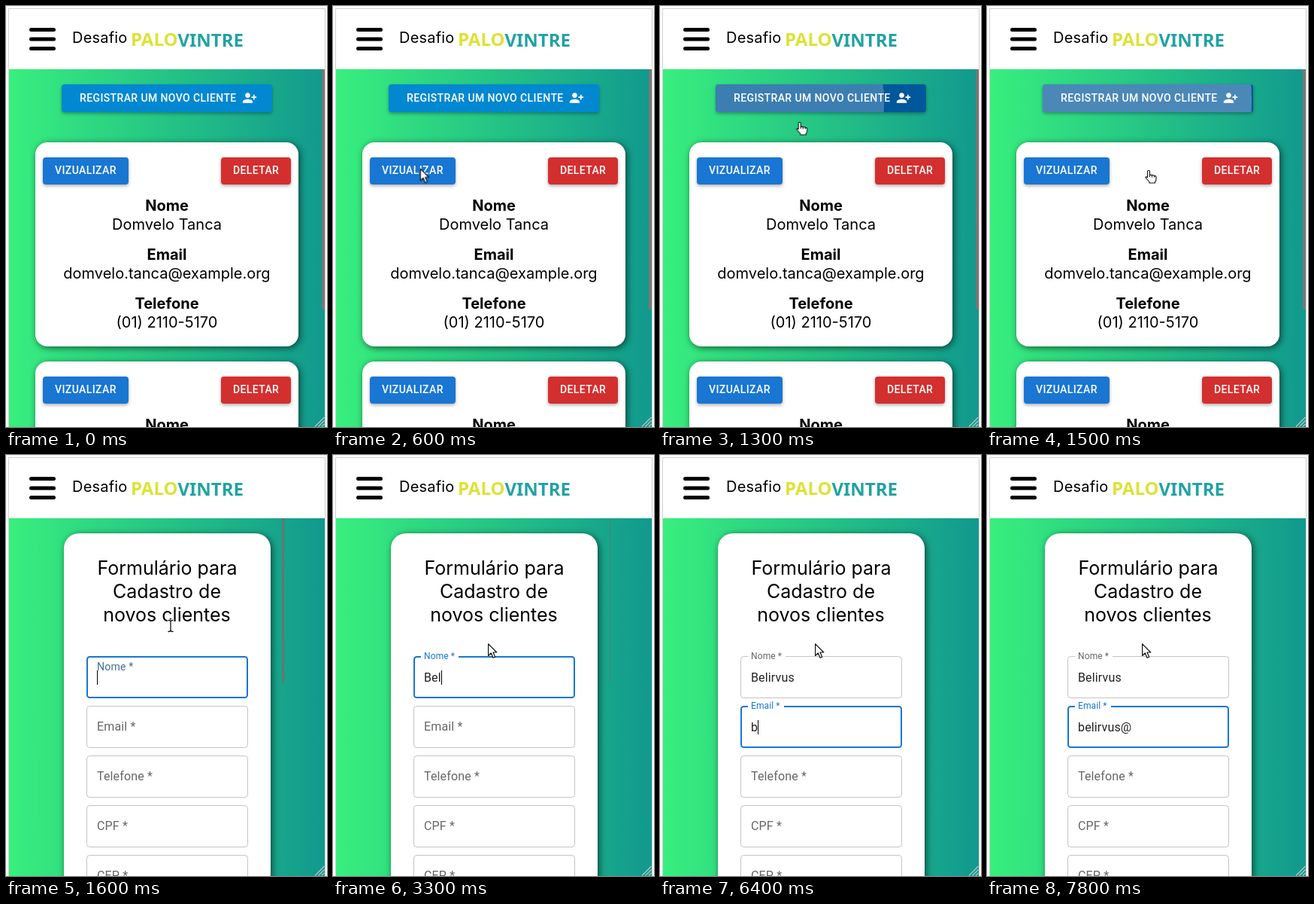
Write an HTML page that moves like this. It is 427 px wide and 559 px high and loops after 8 s.

```html
<!DOCTYPE html>
<html lang="pt-BR">
<head>
<meta charset="utf-8">
<title>Cadastro de clientes</title>
<style>
html, body { margin: 0; width: 100%; height: 100%; overflow: hidden; background: #fafafa; }
svg { display: block; width: 427px; height: 559px; }
text { white-space: pre; }

.body { font: 400 20px Inter, sans-serif; }
.bold { font-weight: 700; }
.mid { text-anchor: middle; }
.title { font: 400 25px Inter, sans-serif; text-anchor: middle; }
.brand { font: 600 24px "Noto Sans", "Open Sans", sans-serif; }
.btn { font: 500 14px Roboto, sans-serif; letter-spacing: .4px; fill: #fff; }
.field { font: 400 16px Roboto, sans-serif; letter-spacing: .15px; fill: rgba(0,0,0,.6); }
.value { fill: rgba(0,0,0,.87); }
.outline { fill: none; stroke: rgba(0,0,0,.23); }
.focus { fill: #fff; stroke: #1976d2; stroke-width: 2; }
.paper { fill: #fff; filter: drop-shadow(2px 2px 5px rgba(0,0,0,.6)); }
.raised { filter: drop-shadow(0 2px 2px rgba(0,0,0,.32)); }

#list, #form, #hover, #ripple, #scroll, #focusName, #focusMail, .notch, .label,
#cursor, #arrow, #hand, #beam { animation: 8s linear infinite; }

/* pages */
#list { animation-name: list; animation-timing-function: step-end; }
#form { animation-name: form; animation-timing-function: step-end; }
@keyframes list { 0% { visibility: visible } 20%, 100% { visibility: hidden } }
@keyframes form { 0% { visibility: hidden } 20%, 100% { visibility: visible } }

/* main button */
#hover { animation-name: hover; }
@keyframes hover {
  0%, 9.625% { fill: #0288d1; animation-timing-function: cubic-bezier(.4,0,.2,1) }
  12.75%, 100% { fill: #01579b }
}
#ripple { animation-name: ripple; transform-box: fill-box; transform-origin: center; }
@keyframes ripple {
  0%, 13.24% { transform: scale(0); opacity: 0 }
  13.25% { transform: scale(0); opacity: .1; animation-timing-function: cubic-bezier(.4,0,.2,1) }
  20.125%, 100% { transform: scale(1); opacity: .3 }
}

/* form */
#scroll { animation-name: scroll; transform-box: fill-box; transform-origin: 60% 0; }
@keyframes scroll {
  0%, 37.5% { opacity: 1; transform: none }
  40% { transform: scaleX(.5) }
  46.25%, 100% { opacity: 0; transform: scaleX(.5) }
}
#focusName { animation-name: focusName; animation-timing-function: step-end; }
#focusMail { animation-name: focusMail; animation-timing-function: step-end; }
@keyframes focusName { 0% { opacity: 0 } 20% { opacity: 1 } 52.5%, 100% { opacity: 0 } }
@keyframes focusMail { 0% { opacity: 0 } 52.5%, 100% { opacity: 1 } }

.notch { fill: #fff; transform-box: fill-box; transform-origin: left; }
#notchName { animation-name: notchName; }
#notchMail { animation-name: notchMail; }
@keyframes notchName { 0%, 20.2% { transform: scaleX(0) } 21.25%, 100% { transform: none } }
@keyframes notchMail { 0%, 52.7% { transform: scaleX(0) } 53.75%, 100% { transform: none } }

#labelName { animation-name: labelName; }
#labelMail { animation-name: labelMail; }
@keyframes labelName {
  0%, 19.56% { transform: none; fill: rgba(0,0,0,.6); animation-timing-function: cubic-bezier(0,0,.2,1) }
  22.06%, 52.06% { transform: translateY(-29px) scale(.75); fill: #1976d2 }
  54.56%, 100% { transform: translateY(-29px) scale(.75); fill: rgba(0,0,0,.6) }
}
@keyframes labelMail {
  0%, 52.06% { transform: none; fill: rgba(0,0,0,.6); animation-timing-function: cubic-bezier(0,0,.2,1) }
  54.56%, 100% { transform: translateY(-29px) scale(.75); fill: #1976d2 }
}

/* pointer */
#cursor { animation-name: move; animation-timing-function: step-end; }
@keyframes move {
  0% { transform: translate(23px,430px) }
  2.5% { transform: translate(23px,430px); animation-timing-function: steps(3) }
  6.25% { transform: translate(88px,262px); animation-timing-function: steps(3) }
  10% { transform: translate(171px,122px) }
  15% { transform: translate(171px,122px); animation-timing-function: steps(3) }
  18.75% { transform: translate(215px,218px) }
  20% { transform: translate(219px,227px) }
  25% { transform: translate(215px,232px) }
  26.25%, 100% { transform: translate(206px,250px) }
}
#arrow { animation-name: arrow; animation-timing-function: step-end; }
#hand { animation-name: hand; animation-timing-function: step-end; }
#beam { animation-name: beam; animation-timing-function: step-end; }
@keyframes arrow { 0% { opacity: 0 } 2.5% { opacity: 1 } 10% { opacity: 0 } 25%, 100% { opacity: 1 } }
@keyframes hand { 0% { opacity: 0 } 10% { opacity: 1 } 20%, 100% { opacity: 0 } }
@keyframes beam { 0% { opacity: 0 } 20% { opacity: 1 } 25%, 100% { opacity: 0 } }
</style>
</head>
<body>
<svg viewBox="0 0 427 559">
  <defs>
    <linearGradient id="green"><stop stop-color="#38ef7d"/><stop offset="1" stop-color="#11998e"/></linearGradient>
    <clipPath id="btnClip"><rect x="74" y="104" width="280" height="37" rx="4"/></clipPath>
    <clipPath id="formClip"><rect x="58" y="84" width="312" height="475"/></clipPath>
  </defs>

  <rect width="427" height="559" fill="#fafafa"/>
  <path d="M3.5 559V3.5H424.5V559" fill="#fff" stroke="#d2d2d2"/>
  <rect x="4" y="84" width="420" height="475" fill="url(#green)"/>

  <!-- header -->
  <path d="M33.5 31.5H63.5M33.5 44H63.5M33.5 56.5H63.5" stroke="#000" stroke-width="5" stroke-linecap="round"/>
  <text class="body" x="88" y="49" letter-spacing=".2">Desafio</text>
  <text class="brand" x="166" y="52.5" fill="#dde236">PALO<tspan dy="1" fill="#22a2a3">VINTRE</tspan></text>

  <g id="list">
    <g class="raised">
      <rect id="hover" x="74" y="104" width="280" height="37" rx="4"/>
    </g>
    <g clip-path="url(#btnClip)"><circle id="ripple" cx="171" cy="126" r="186" fill="#fff"/></g>
    <text class="btn" x="98" y="127">REGISTRAR UM NOVO CLIENTE</text>
    <path transform="translate(314 112) scale(.8333)" fill="#fff" d="M13 8c0-2.21-1.79-4-4-4S5 5.790 5 8s1.790 4 4 4 4-1.790 4-4zm2 2v2h3v3h2v-3h3v-2h-3V7h-2v3zM1 18v2h16v-2c0-2.660-5.330-4-8-4s-8 1.340-8 4z"/>

    <g id="card">
      <rect class="paper" x="39" y="181" width="350" height="271" rx="16"/>
      <rect class="raised" x="49" y="201" width="114" height="36" rx="4" fill="#1976d2"/>
      <rect class="raised" x="286" y="201" width="93" height="36" rx="4" fill="#d32f2f"/>
      <text class="btn" x="65" y="223">VIZUALIZAR</text>
      <text class="btn" x="302" y="223">DELETAR</text>
      <g class="body mid">
        <text class="bold" x="214" y="272">Nome</text>
        <text x="214" y="297">Domvelo Tanca</text>
        <text class="bold" x="214" y="337">Email</text>
        <text x="214" y="362">domvelo.tanca@example.org</text>
        <text class="bold" x="214" y="402">Telefone</text>
        <text x="214" y="427">(01) 2110-5170</text>
      </g>
    </g>
    <use href="#card" y="291"/>
    <rect x="420" y="84" width="4" height="319" rx="1.500" fill="#777"/>
  </g>

  <g id="form">
    <g clip-path="url(#formClip)"><rect class="paper" x="77" y="104" width="275" height="520" rx="20"/></g>
    <rect id="scroll" x="367" y="84" width="3" height="219" fill="#6a7472"/>
    <g class="title">
      <text x="214.500" y="159">Formulário para</text>
      <text x="214" y="190">Cadastro de</text>
      <text x="214" y="221">novos clientes</text>
    </g>

    <g class="outline">
      <rect x="107.500" y="267.500" width="214" height="55" rx="4"/>
      <rect x="107.500" y="333.500" width="214" height="55" rx="4"/>
      <rect x="107.500" y="399.500" width="214" height="55" rx="4"/>
      <rect x="107.500" y="465.500" width="214" height="55" rx="4"/>
      <rect x="107.500" y="531.500" width="214" height="55" rx="4"/>
    </g>
    <rect id="focusName" class="focus" x="108" y="268" width="213" height="54" rx="3.500"/>
    <rect id="focusMail" class="focus" x="108" y="334" width="213" height="54" rx="3.500"/>
    <rect id="notchName" class="notch" x="117" y="266" width="50" height="4"/>
    <rect id="notchMail" class="notch" x="117" y="332" width="48" height="4"/>

    <g class="field">
      <g transform="translate(121 300)"><text id="labelName" class="label">Nome *</text></g>
      <g transform="translate(121 366)"><text id="labelMail" class="label">Email *</text></g>
      <text x="121" y="432">Telefone *</text>
      <text x="121" y="498">CPF *</text>
      <text x="121" y="564">CEP *</text>
      <text id="name" class="value" x="121" y="301"></text>
      <text id="mail" class="value" x="121" y="367"></text>
    </g>
    <rect id="nameCaret" y="286" width="1" height="19"/>
    <rect id="mailCaret" y="352" width="1" height="19"/>
  </g>

  <!-- resize grip -->
  <path d="M411 558.500L423.500 546M415.500 558.500L423.500 550.500M420 558.500L423.500 555" stroke="#bcc4c4" stroke-width="1.200"/>

  <g id="cursor" stroke-linejoin="round">
    <path id="arrow" d="M.6.8V16.500L4.300 13 7 19.300 9.700 18.200 7 12H11.800Z" fill="#fff" stroke="#111" stroke-width="1.200"/>
    <g id="hand" fill="#fff" stroke="#111" stroke-width="1.100">
      <path d="M-1.500 1.800a1.500 1.500 0 0 1 3 0V6.500q1.500-1 3 .3q1.700-.7 3 .6q2-.3 2.500 1.600V12q0 2-1.500 3.500V17H1V15.500L-4 10q0-2 2.500-.5Z"/>
      <path d="M1.500 6.500V9M4.500 7V9.500M7.500 7.500V9.500"/>
    </g>
    <g id="beam" fill="none" stroke-linecap="round">
      <path id="ibar" d="M-3-7.500Q0-7.500 0-5.500V5.500Q0 7.500-3 7.500M3-7.500Q0-7.500 0-5.500M0 5.500Q0 7.500 3 7.500" stroke="#fff" stroke-width="3"/>
      <path d="M-3-7.500Q0-7.500 0-5.500V5.500Q0 7.500-3 7.500M3-7.500Q0-7.500 0-5.500M0 5.500Q0 7.500 3 7.500" stroke="#111" stroke-width="1.300"/>
    </g>
  </g>
</svg>
<script>
const LOOP = 8000;
const byId = id => document.getElementById(id);

// keys: time of each keystroke; blink: spans in which the caret shows
const inputs = [
  { id: 'name', text: 'Belirvus',
    keys: [2800, 3100, 3300, 3400, 3500, 3600, 3700, 3900],
    blink: [[1600, 2700], [2800, 4200]] },
  { id: 'mail', text: 'belirvus@',
    keys: [6400, 6500, 6600, 6700, 6800, 6900, 7100, 7200, 7600],
    blink: [[4200, 5400], [6400, 7800]] }
];

function render(t) {
  for (const { id, text, keys, blink } of inputs) {
    const value = byId(id), caret = byId(id + 'Caret');
    value.textContent = text.slice(0, keys.filter(k => k <= t).length);
    const width = value.textContent ? value.getComputedTextLength() : 0;
    caret.setAttribute('x', Math.round(121 + width));
    caret.setAttribute('opacity', blink.some(([a, b]) => t >= a && t < b) ? 1 : 0);
  }
}

let start;
function tick(now) {
  start ??= now;
  render((now - start) % LOOP);
  requestAnimationFrame(tick);
}
render(0);
requestAnimationFrame(tick);
</script>
</body>
</html>
```
